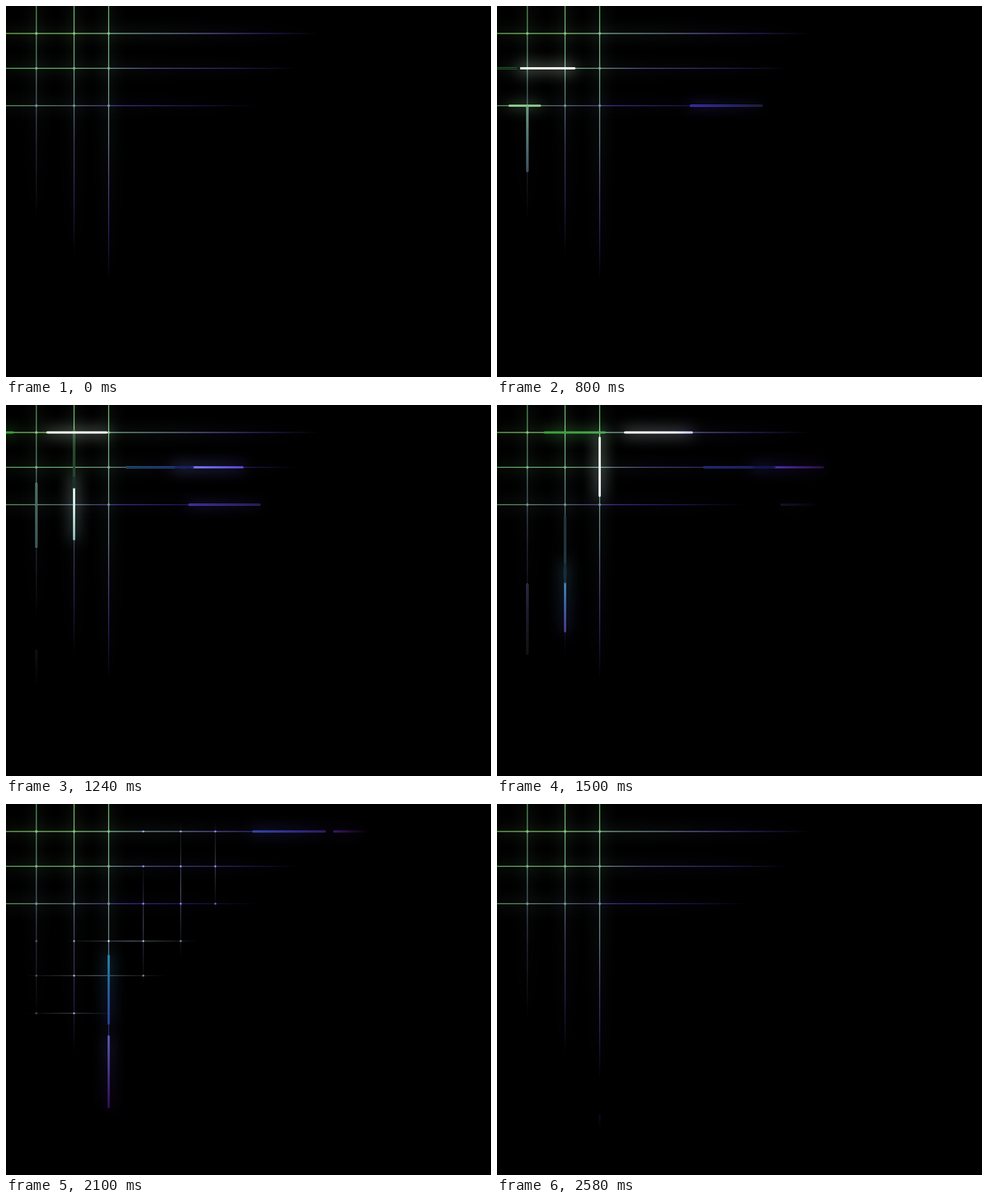
Write an HTML page with a canvas that moves like this. It is 855x655 px and loops after 2.84 s.

```html
<!DOCTYPE html>
<html lang="en">
<head>
<meta charset="utf-8">
<title>Light grid</title>
<style>
  html, body { margin: 0; width: 100%; height: 100%; overflow: hidden; background: #000; }
  canvas { display: block; }
</style>
</head>
<body>
<canvas id="stage" width="855" height="655"></canvas>
<script>
const ctx = document.getElementById('stage').getContext('2d');
const LOOP = 2840, START = 160, END = 2580, STEP = 20;
const xs = [53.5, 120, 181, 242, 308, 369];
const ys = [48.5, 110, 176, 242, 303, 369.5];

// Colour ramps are "position colour" pairs in pixels along the line.
const rows = [
  { at: ys[0], base: '0 #5f954a 120 #659a55 181 #66907a 300 #56646f 370 #454078 450 #241d50 553 #000' },
  { at: ys[1], base: '0 #4c8850 120 #568a58 181 #567468 260 #3c3a68 400 #231a4c 515 #000' },
  { at: ys[2], base: '0 #4c7452 70 #4a6458 140 #40485a 200 #30266a 310 #1c1448 445 #000' }
];
const cols = [
  { at: xs[0], vertical: true, base: '0 #4c7c4a 110 #48685a 176 #3c4450 240 #272736 380 #000' },
  { at: xs[1], vertical: true, base: '0 #5c945a 110 #56806a 176 #485a66 240 #363549 340 #201c3c 443 #000' },
  { at: xs[2], vertical: true, base: '0 #5a965a 110 #5f8c78 240 #54686e 300 #443f62 400 #221a48 486 #000' }
];

const whiteH = '0 #f4fff0 230 #fff 310 #f2f4ff 343 #c4ccff 423 #7f8ce4 490 #5448c0 553 #4a2a98 590 #32124e 640 #000';
const greenBlue = '0 #36a030 189 #46a04c 281 #2a80d0 340 #2c60c8 430 #3848b0 565 #2e1c62 640 #000';
const whiteV = '0 #f0fff4 165 #f4fffc 256 #dcebee 320 #a4cbdc 381 #5a68bc 440 #4c48a0 538 #300a50 575 #000';
const tealBlue = '0 #3a9a5c 113 #30967a 175 #2c84a0 266 #2088ac 330 #245c9c 394 #2c3c90 500 #28124a 575 #000';

// A pulse has its tail at `from` px at time `at`; `core` gives it a dark inside.
const pulses = [
  { line: rows[2], from: 340, at: 800, speed: .6, short: true,
    ramp: '0 #7ab87c 76 #88c088 200 #504a98 340 #5540d8 400 #3c38a0 466 #24244e 570 #000',
    core: '0 #90c890 76 #80bc84 200 #403888 340 #2a1f92 466 #181838 570 #000' },
  { line: rows[2], from: 20, at: 800, speed: .685, short: true,
    ramp: '0 #86c088 76 #88c088 200 #504a98 321 #5a42b8 453 #2c2660 500 #181428 570 #000',
    core: '0 #a0d0a0 76 #88c488 200 #403888 321 #342494 453 #201a4c 570 #000' },
  { line: cols[0], from: 175, at: 800, speed: .584,
    ramp: '0 #6aa870 175 #90c8a0 220 #749c98 279 #62788c 340 #30344c 432 #121816 495 #000',
    core: '0 #447850 175 #5c9070 279 #34505e 340 #1c2030 495 #000' },
  { line: cols[0], from: 137, at: 1240, speed: .685,
    ramp: '0 #5c9068 137 #6c9c84 245 #587c7c 315 #4a486c 380 #2c2844 446 #121a16 495 #000',
    core: '0 #305a3c 137 #3a6450 245 #304c50 315 #1c1a30 446 #0b100e 495 #000' },
  { line: rows[1], from: 35, at: 800, speed: .588, glow: true,
    ramp: '0 #f4fff0 131 #fff 250 #b8c4f4 331 #7478e8 422 #5444cc 495 #4a2ca4 567 #2c104a 615 #000' },
  { line: rows[1], from: -48, at: 800, speed: .588,
    ramp: '0 #306034 100 #34644c 211 #34708c 330 #3044a0 420 #303488 495 #2c2c74 564 #14102e 615 #000',
    core: '0 #0a240c 100 #0c2c24 211 #0c2c4c 330 #18206c 495 #10144a 615 #000' },
  { line: cols[1], from: 125, at: 1240, speed: .585, glow: true,
    ramp: '0 #f0fff0 130 #e8fff4 180 #d0eee6 243 #84b8b8 321 #407ea8 360 #3c5ca0 409 #483488 480 #28164a 548 #000' },
  { line: cols[1], from: 43, at: 1240, speed: .585,
    ramp: '0 #3c6c40 100 #3c6848 196 #34505a 321 #304c5c 395 #222038 500 #121020 548 #000',
    core: '0 #123818 100 #183c20 196 #14262c 321 #14303a 395 #101020 548 #000' },
  { line: rows[0], from: 71, at: 1240, speed: .588, ramp: whiteH, glow: true },
  { line: rows[0], from: -70, at: 1240, speed: .586, ramp: greenBlue, glow: true },
  { line: cols[2], from: 56, at: 1500, speed: .587, ramp: whiteV, glow: true },
  { line: cols[2], from: 113, at: 1840, speed: .588, ramp: tealBlue, glow: true }
];

function gradient(line, ramp) {
  const parts = ramp.split(' ');
  const end = +parts[parts.length - 2];
  const g = line.vertical ? ctx.createLinearGradient(0, 0, 0, end) : ctx.createLinearGradient(0, 0, end, 0);
  for (let i = 0; i < parts.length; i += 2) g.addColorStop(parts[i] / end, parts[i + 1]);
  return { g, end };
}

function stroke(line, ramp, from, to, width, blur = 0) {
  const { g, end } = gradient(line, ramp);
  to = Math.min(to, end);
  const inset = blur ? 0 : width / 2;
  if (to - from <= 2 * inset) return;
  const point = p => line.vertical ? [line.at, p] : [p, line.at];
  ctx.save();
  if (blur) {
    ctx.filter = `blur(${blur}px)`;
    ctx.globalCompositeOperation = 'lighter';
  }
  ctx.strokeStyle = g;
  ctx.lineWidth = width;
  ctx.lineCap = blur ? 'butt' : 'round';
  ctx.beginPath();
  ctx.moveTo(...point(from + inset));
  ctx.lineTo(...point(to - inset));
  ctx.stroke();
  ctx.restore();
}

function dot(x, y, r, color) {
  ctx.fillStyle = color;
  ctx.beginPath();
  ctx.arc(x, y, r, 0, 7);
  ctx.fill();
}

function drawBase() {
  ctx.save();
  ctx.globalCompositeOperation = 'lighter';
  for (const line of [...rows, ...cols]) {
    stroke(line, line.base, -5, 999, 2, 12);
    stroke(line, line.base, -5, 999, 2);
  }
  ctx.restore();
  ys.slice(0, 3).forEach((y, j) => xs.slice(0, 3).forEach(x =>
    dot(x, y, 2.3, ['#8fbf87', '#82ad84', '#6f948a'][j])));
}

function span(p, t) {
  const from = p.from + p.speed * (t - p.at);
  const size = p.short ? 135 - 90 * Math.exp(-from / 130) : 135 - 37 * Math.exp(-from / 220);
  return [from, from + Math.max(0, size)];
}

// Swelling where a dark pulse runs over the bright one ahead of it.
function drawOverlap(p, from, to) {
  if (to <= from || to < 0) return;
  const middle = (from + to) / 2, half = (to - from) / 2;
  const { g } = gradient(p.line, p.core);
  ctx.fillStyle = g;
  ctx.beginPath();
  if (p.line.vertical) ctx.ellipse(p.line.at, middle, 3, half, 0, 0, 7);
  else ctx.ellipse(middle, p.line.at, half, 2.6, 0, 0, 7);
  ctx.fill();
}

function drawPulses(t) {
  pulses.forEach((p, i) => {
    const [from, to] = span(p, t);
    if (to <= 0) return;
    if (p.glow) stroke(p.line, p.ramp, from, to, 4, 13);
    else if (p.short) stroke(p.line, p.ramp, from, to, 3, 11);
    stroke(p.line, p.ramp, from, to, 4);
    if (!p.core) return;
    stroke(p.line, p.core, from + 1, to - 1, 2);
    const ahead = pulses[i - 1];
    if (ahead && ahead.glow && ahead.line === p.line) drawOverlap(p, span(ahead, t)[0], to);
  });
}

// Hidden cells of the grid flash up briefly.
function drawFlash(t) {
  if (t <= 1900 || t >= 2300) return;
  ctx.save();
  ctx.globalAlpha = Math.sin((t - 1900) / 400 * Math.PI) ** 2;
  ctx.globalCompositeOperation = 'lighter';
  const faint = (at, from, to, color, vertical) => {
    const g = vertical ? ctx.createLinearGradient(0, from, 0, to) : ctx.createLinearGradient(from, 0, to, 0);
    g.addColorStop(0, '#000');
    g.addColorStop(.5, color);
    g.addColorStop(1, '#000');
    ctx.fillStyle = g;
    if (vertical) ctx.fillRect(at - .7, from, 1.4, to - from);
    else ctx.fillRect(from, at - .7, to - from, 1.4);
  };
  faint(xs[3], 100, 322, '#48445f', true);
  faint(xs[4], 28, 274, '#55586c', true);
  faint(xs[5], 28, 186, '#40404f', true);
  faint(ys[3], 106, 338, '#5a6c74');
  faint(ys[4], 34, 282, '#58605f');
  faint(ys[5], 38, 192, '#40424c');
  ys.forEach((y, j) => xs.forEach((x, i) => {
    if (Math.max(i, j) > 2 && i + j < 8) dot(x, y, 2, j > 2 ? (i ? '#50606a' : '#343840') : '#48488a');
  }));
  ctx.restore();
}

function draw(now) {
  const t = Math.min(END, Math.floor((now % LOOP) / STEP) * STEP);
  ctx.fillStyle = '#000';
  ctx.fillRect(0, 0, 855, 655);
  drawBase();
  drawFlash(t);
  if (t >= START) drawPulses(t);
}

const begin = performance.now();
(function tick() {
  draw(performance.now() - begin);
  requestAnimationFrame(tick);
})();
</script>
</body>
</html>
```
